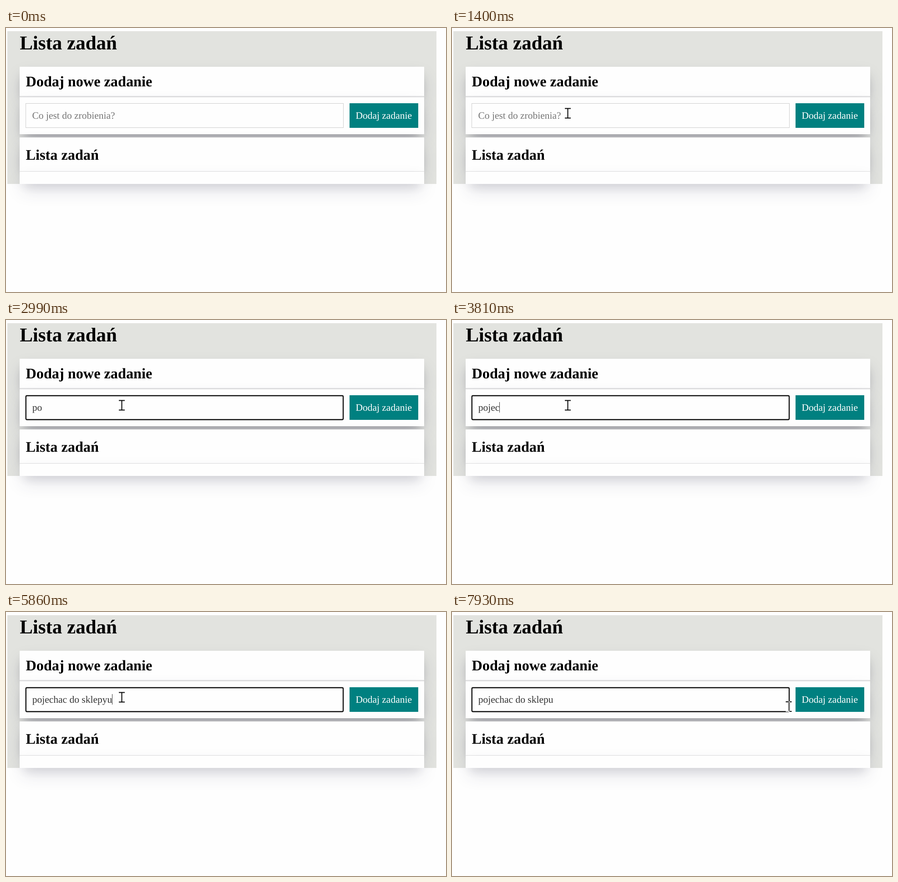
Animation of 967x579 px, one loop 8 s. Source, as an HTML page:

```html
<!DOCTYPE html>
<html lang="pl">
<head>
<meta charset="utf-8">
<title>Lista zadań</title>
<style>
html, body { margin: 0; width: 100%; height: 100%; overflow: hidden; background: #fefefe; }
div, svg { position: absolute; box-sizing: border-box; }
svg { left: 0; top: 0; width: 967px; height: 579px; }
.page { left: 3px; top: 7px; width: 943px; height: 335px; background: #e2e3df; }
.block {
  left: 30px; width: 889px; background: #fefefe;
  box-shadow: 0 17.5px 36px -6.7px rgba(50, 50, 93, .25), 0 10.7px 21.5px -10.7px rgba(0, 0, 0, .3);
}
.field { left: 43px; top: 165px; width: 699px; height: 54px; border: 1px solid #ccc; background: #fefefe; }
.button { left: 755px; top: 165px; width: 151px; height: 54px; background: #008080; }
text { font: 21.5px "Liberation Serif", "Times New Roman", serif; white-space: pre; text-rendering: geometricPrecision; }
.h1 { font-size: 43px; font-weight: bold; }
.h2 { font-size: 32.26px; font-weight: bold; }
#beam { mix-blend-mode: difference; }
</style>
</head>
<body>
<div class="page"></div>
<div class="block" style="top:85px;height:67px;border-bottom:3px solid #e2e2e3"></div>
<div class="block" style="top:152px;height:81px"></div>
<div class="block" style="top:240px;height:75px;border-bottom:1px solid #ddd"></div>
<div class="block" style="top:315px;height:27px"></div>
<div class="field"></div>
<div class="button"></div>
<svg>
  <text class="h1" x="30.2" y="46.5">Lista zadań</text>
  <text class="h2" x="43.5" y="128">Dodaj nowe zadanie</text>
  <text class="h2" x="43.5" y="289">Lista zadań</text>
  <text x="768.4" y="198.7" fill="#fff">Dodaj zadanie</text>
  <rect id="ring" x="43.75" y="166" width="697.3" height="52.5" rx="2.5" fill="none" stroke="#101010" stroke-width="2.4"/>
  <text id="hint" x="57.5" y="198.7" fill="#757575">Co jest do zrobienia?</text>
  <text id="typed" x="57.7" y="198.7" fill="#333"></text>
  <rect id="caret" y="180" width="1" height="23" fill="#333"/>
  <path id="arrow" d="M0 0V22.8L5.4 17.7 8.7 25.5 12 24 8.7 16.3H16z" fill="#fff" stroke="#000"/>
</svg>
<svg id="beam"><path fill="#fff" d="M-6.5 -11.5h13v2h-5.5v19h5.5v2h-13v-2h5.5v-19h-5.5z"/></svg>
<script>
const LOOP = 8000, FOCUS = 1470;
const $ = id => document.getElementById(id);
const ring = $('ring'), hint = $('hint'), typed = $('typed'), caret = $('caret');
const arrow = $('arrow'), beam = $('beam').firstChild;

// Keystrokes: '<' deletes a letter, '|' blinks the caret off
const keys = [
  [FOCUS, ''], [2000, '|'], [2330, 'p'], [2460, 'o'], [2990, '|'], [3410, 'j'], [3540, 'e'],
  [3810, 'c'], [3880, 'h'], [4080, 'a'], [4280, 'c'], [4410, ' '], [4540, 'd'], [4670, 'o'],
  [4800, ' '], [4870, 's'], [5000, 'k'], [5070, 'l'], [5270, 'e'], [5530, 'p'], [5860, 'yu'],
  [6320, '|'], [6390, '<'], [6450, '<'], [6930, '|'], [7060, 'u'], [7660, '|']
];

// Pointer stops after the first sweep: time, x, y
const stops = [
  [1330, 249, 182], [1400, 254.5, 187], [7800, 430, 180.5], [7860, 620, 188], [7930, 740, 207.5]
];

function pointerAt(t) {
  const stop = stops.filter(s => s[0] <= t).pop();
  if (stop) return [stop[1], stop[2]];
  const u = Math.min(10, Math.floor((t - 510) / 75)) / 10;
  const e = 1 - (1 - u) ** 2;
  return [581 - 341.5 * e, 389 - 218.5 * e];
}

function show(el, on) {
  el.style.display = on ? '' : 'none';
}

function draw(now) {
  const t = now % LOOP;

  let value = '', lit = false;
  for (const [time, key] of keys) {
    if (time > t) break;
    lit = key !== '|';
    if (key === '<') value = value.slice(0, -1);
    else if (lit) value += key;
  }
  typed.textContent = value;
  caret.setAttribute('x', Math.round(57.9 + (value ? typed.getComputedTextLength() : 0)));
  show(caret, lit);
  show(hint, !value);
  show(ring, t >= FOCUS);

  const [x, y] = pointerAt(t);
  const inField = x > 43 && x < 742 && y > 165 && y < 219;
  for (const el of [arrow, beam]) {
    el.setAttribute('transform', `translate(${x} ${y})`);
    show(el, t >= 510 && (el === beam) === inField);
  }
  requestAnimationFrame(draw);
}
requestAnimationFrame(draw);
</script>
</body>
</html>
```
